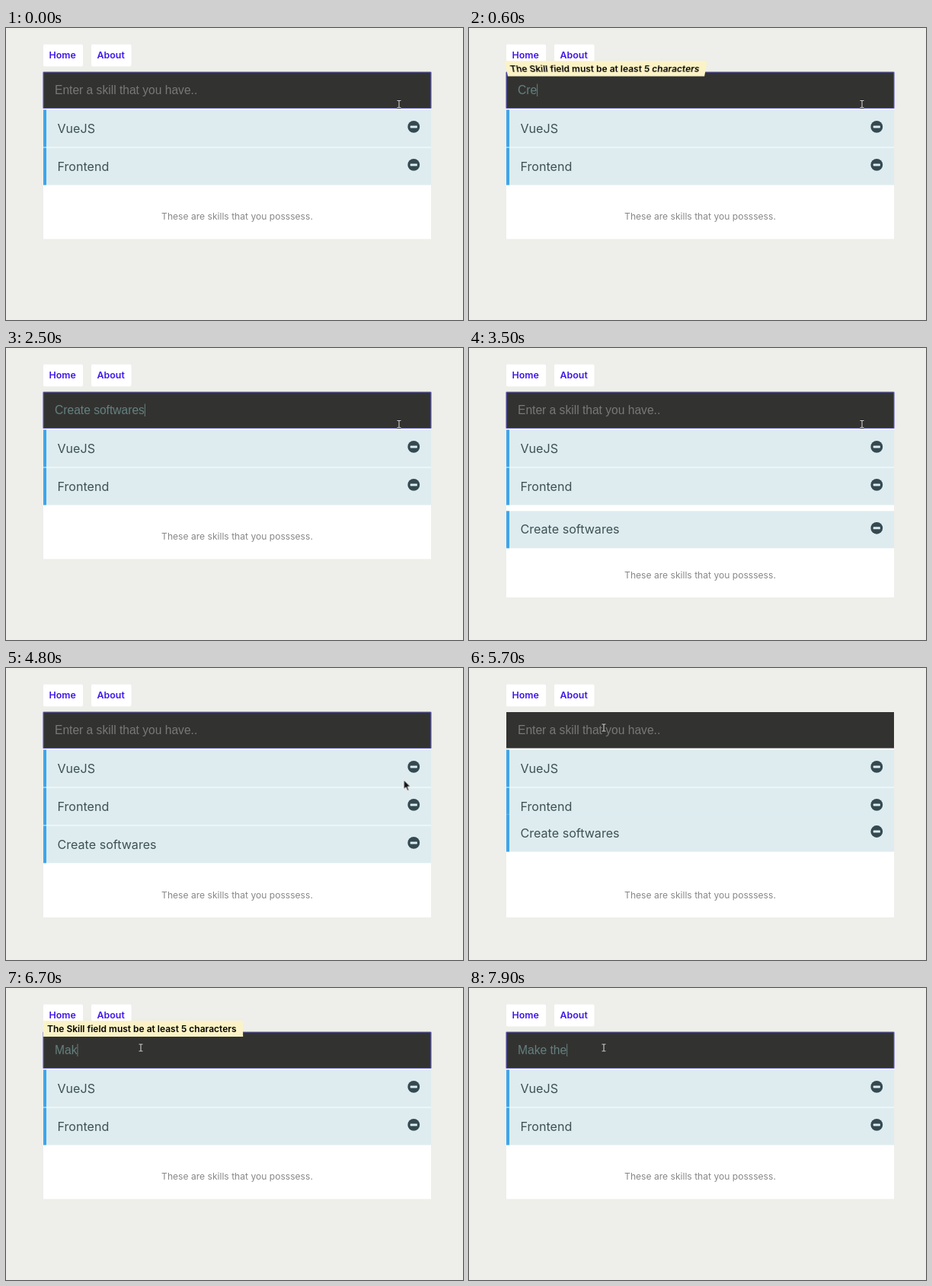
An HTML page that plays this animation: 600 px wide and 384 px high, repeating every 8000 ms.

```html
<!DOCTYPE html>
<html lang="en">
<head>
<meta charset="utf-8">
<title>Skills list</title>
<style>
  html, body { margin: 0; width: 100%; height: 100%; overflow: hidden; background: #eeeeea; }
  svg { position: absolute; left: 0; top: 0; display: block; }
  text { font-family: Inter, "Open Sans", sans-serif; white-space: pre; }
  .tab { font-size: 12.4px; font-weight: 600; fill: #4117ea; }
  .skill { font-size: 16.1px; font-weight: 400; fill: #3e5252; }
  .note { font-size: 12.1px; fill: #888; text-anchor: middle; }
  .field { font-family: "Liberation Sans", Arial, sans-serif; font-size: 15.6px; }
  #alert {
    position: absolute; left: 49px; top: 43px; width: 262px; height: 21px;
    box-sizing: border-box; padding-left: 5px; opacity: 0; background: #fbf3c6; color: #000;
    font: 600 12px/21px Inter, "Open Sans", sans-serif; white-space: nowrap;
  }
</style>
</head>
<body>
<svg width="600" height="384" viewBox="0 0 600 384">
  <defs>
    <g id="row">
      <rect x="49" width="509" height="49" fill="#deecf0"/>
      <rect x="49" width="4" height="49" fill="#3fa5ea"/>
      <circle cx="535.3" cy="22.4" r="7.9" fill="#344a50"/>
      <rect x="530.7" y="20.9" width="9.2" height="3" rx=".6" fill="#deecf0"/>
    </g>
  </defs>
  <rect x="49" y="21.5" width="52" height="29" rx="2" fill="#fff"/>
  <rect x="112" y="21.5" width="52.5" height="29" rx="2" fill="#fff"/>
  <text class="tab" x="56.5" y="39.5">Home</text>
  <text class="tab" x="119.5" y="39.5">About</text>

  <rect id="card" x="49" y="58" width="509" height="219.5" fill="#fff"/>
  <rect x="49" y="58" width="509" height="47.5" fill="#323331"/>
  <rect id="focus" x="49" y="58" width="509" height="47.5" rx=".5" fill="none" stroke="#5d59bd" stroke-width="1.2"/>
  <text class="field" id="hint" x="64" y="87.3" fill="#787876">Enter a skill that you have..</text>
  <text class="field" id="typed" x="64" y="87.3" fill="#66807f"></text>
  <rect id="caret" y="73.5" width="1" height="16.5" fill="#66807f"/>

  <use href="#row" y="107.5"/>
  <text class="skill" x="67.5" y="137.5">VueJS</text>
  <use href="#row" y="157.5"/>
  <text class="skill" x="67.5" y="187.5">Frontend</text>
  <text class="note" id="note" x="303.5" y="252">These are skills that you posssess.</text>
  <g id="added">
    <use href="#row" y="207.5"/>
    <text class="skill" x="67.5" y="237.5">Create softwares</text>
  </g>
</svg>
<div id="alert">The Skill field must be at least 5 characters</div>
<svg width="600" height="384" viewBox="0 0 600 384">
  <g id="mouse">
    <g id="beam" fill="none">
      <path d="M-2.5-4.5H-.8L0-4 .8-4.5H2.5M0-4V4M-2.5 4.5H-.8L0 4 .8 4.5H2.5" stroke="#222" stroke-width="2.4"/>
      <path d="M-2.5-4.5H-.8L0-4 .8-4.5H2.5M0-4V4M-2.5 4.5H-.8L0 4 .8 4.5H2.5" stroke="#ddd" stroke-width="1.1"/>
    </g>
    <path id="arrow" d="M0 0V12L2.8 9.4 4.8 14 6.7 13.2 4.8 8.8H8.6Z" fill="#111" stroke="#fff" stroke-width=".8"/>
  </g>
</svg>
<script>
const LOOP = 8000, STEP = 100;
const $ = id => document.getElementById(id);
const show = (id, on) => { $(id).style.visibility = on ? "visible" : "hidden"; };
const within = (t, spans) => spans.some(([a, b]) => t >= a && t < b);

const clips = [];
function clip(id, frames, delay, duration, fill = "none") {
  const a = $(id).animate(frames, { delay, duration, fill });
  a.pause();
  clips.push(a);
}

const tilt = deg => `perspective(210px) rotateX(${deg}deg)`;
const slide = y => `translateY(${y}px)`;

function flipIn(at) {
  clip("alert", [
    { offset: 0, transform: tilt(90), easing: "ease-in" },
    { offset: .4, transform: tilt(-20), easing: "ease-in" },
    { offset: .6, transform: tilt(10), easing: "ease-in" },
    { offset: .8, transform: tilt(-5) },
    { offset: 1, transform: tilt(0) }
  ], at, 1000);
  clip("alert", [{ opacity: 0 }, { offset: .34, opacity: 1 }, { opacity: 1 }], at, 1000);
}

function flipOut(at) {
  clip("alert", [
    { offset: 0, transform: tilt(0), opacity: 1, easing: "ease" },
    { offset: .3, transform: tilt(-20), opacity: 1, easing: "ease" },
    { offset: 1, transform: tilt(90), opacity: 0 }
  ], at, 750);
}

flipIn(150);
flipOut(1150);
flipIn(6350);
flipOut(7050);

const rise = "cubic-bezier(.215,.61,.355,1)";
clip("added", [
  { offset: 0, transform: slide(2250), opacity: 0, easing: rise },
  { offset: .6, transform: slide(-15), opacity: 1, easing: rise },
  { offset: .75, transform: slide(7.5), opacity: 1, easing: rise },
  { offset: .9, transform: slide(-3.75), opacity: 1, easing: rise },
  { offset: 1, transform: slide(0), opacity: 1 }
], 2790, 1000);
clip("added", [
  { offset: 0, transform: slide(0), opacity: 1, easing: "ease" },
  { offset: .2, transform: slide(7.5), opacity: 1, easing: "ease" },
  { offset: .4, transform: slide(-15), opacity: 1, easing: "ease" },
  { offset: .45, transform: slide(-15), opacity: 1, easing: "ease" },
  { offset: 1, transform: slide(1500), opacity: 0 }
], 5317, 1000, "forwards");

// time, x, y of the pointer
const path = [
  [0, 516, 100], [4400, 516, 100], [4700, 519, 126], [5000, 529, 190],
  [5200, 535, 223], [5300, 536, 232], [5400, 515, 216], [5500, 395, 150],
  [5600, 235, 92], [5700, 177, 78.5], [LOOP, 177, 78.5]
];
clip("mouse", path.map(([t, x, y]) => ({ offset: t / LOOP, transform: `translate(${x}px,${y}px)` })), 0, LOOP, "both");

// each phrase: key times, and when the field is cleared
const phrases = [
  { text: "Create softwares", end: 2800,
    keys: [100, 300, 500, 800, 1100, 1200, 1300, 1500, 1600, 1800, 1900, 2000, 2100, 2200, 2300, 2500] },
  { text: "Make the", end: LOOP, keys: [6400, 6600, 6700, 6900, 7000, 7400, 7600, 7900] }
];
const blinks = [[2900, 3400], [3900, 4400], [4900, 5300], [5900, 6400]];

function typedAt(t) {
  const p = phrases.find(p => t >= p.keys[0] && t < p.end);
  return p ? p.text.slice(0, p.keys.filter(k => k <= t).length) : "";
}

function draw(t) {
  for (const c of clips) c.currentTime = t;
  const value = typedAt(t);
  $("typed").textContent = value;
  show("hint", !value);
  show("caret", value || within(t, blinks));
  $("caret").setAttribute("x", 64 + (value ? $("typed").getComputedTextLength() : 0));

  const grown = within(t, [[2800, 6400]]);
  show("added", grown);
  $("card").setAttribute("height", grown ? 270 : 219.5);
  $("note").setAttribute("y", grown ? 302.5 : 252);
  show("focus", !within(t, [[5300, 5900]]));

  const away = within(t, [[4500, 5600]]);
  show("beam", !away);
  show("arrow", away);
}

const start = performance.now();
function tick() {
  const t = (performance.now() - start) % LOOP;
  draw(Math.floor(t / STEP) * STEP);
  requestAnimationFrame(tick);
}
tick();
</script>
</body>
</html>
```
